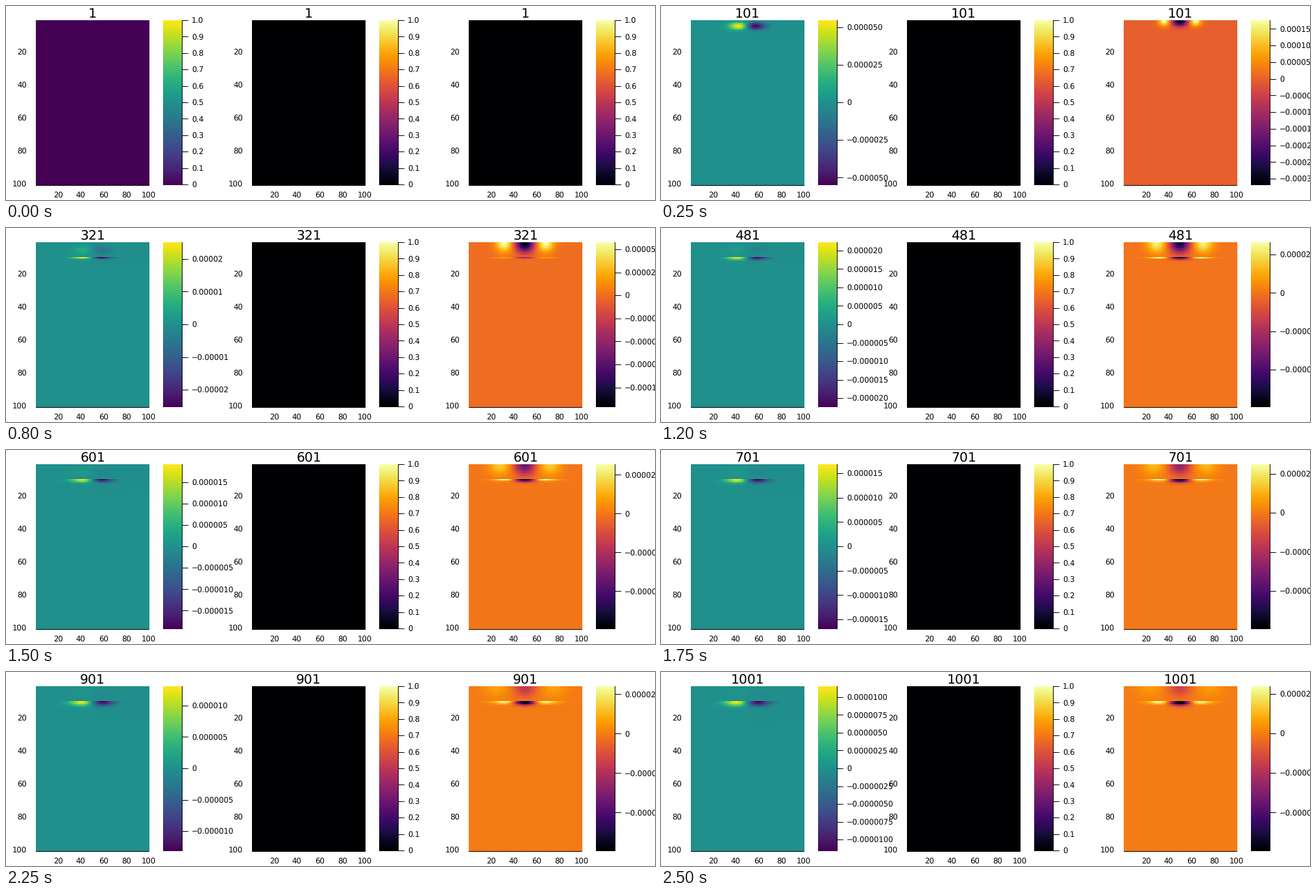
A matplotlib script that plays this animation: 1000 by 300 pixels, repeating every 2.55 s.

```python
import numpy as np
import matplotlib.pyplot as plt
from matplotlib.animation import FuncAnimation
from matplotlib.collections import LineCollection

W, H, DPI = 1000, 300, 100
FRAMES, INTERVAL, STEP = 51, 50, 20
TOP, BOTTOM, WIDTH = 22, 277, 175
BAR_X, BAR_END, TICK = 196, 225, 10
LABEL, TITLE = 11.6 * 0.72, 20.3 * 0.72
N = 100

plt.rcParams["font.family"] = "DejaVu Sans"
plt.rcParams["text.hinting"] = "none"

X = np.arange(1, N + 1)[None, :] - 50.0
Y = np.arange(1, N + 1)[:, None] * 1.0
ABOVE, BELOW = Y < 10, Y >= 10


def bell(d, s):
    return np.exp(-d**2 / (2 * s**2))


def rise(t, scale, power=1):
    return 1 - np.exp(-(t / scale) ** power)


def decay(t, scale, power):
    return 1 / (1 + (t / scale) ** power)


def dipole_field(t):
    """A sinking pair of opposite blobs that feeds a pair held at row 10."""
    s = 6.6 + 0.095 * np.sqrt(t)
    pair = -X / s * np.exp(0.5) * bell(X, s)
    blob = bell(Y - 1.5 - 3.9 * rise(t, 100), 2 * rise(t, 65)) * ABOVE
    held = bell(Y - 10, 0.0017 * t) * BELOW
    flow = 4.1 * np.exp(-t / 790) * rise(t, 235, 3)
    field = pair * (22.7 * decay(t, 60, 2.2) * blob + flow * held)
    top = np.abs(field).max()
    return field * 1e-5, -top * 1e-5, top * 1e-5


def hat_field(t):
    """A spreading dip with side lobes at the surface and a layer at row 10."""
    r = np.sqrt(t)
    peak = 38.7 * decay(t, 216, 2)
    ratio = 0.39 + 0.22 * np.exp(-t / 350)
    lobes = ratio * bell(np.abs(X) - 8 - 0.57 * r, 1.5 + 0.21 * r)
    surface = (lobes - bell(X, 3.5 + 0.11 * r)) * ABOVE
    surface = surface * bell(Y - 1, 4.2 * rise(t, 150))

    s, full = 10.5, 7.4
    hat = ((X / s) ** 2 - 1) * bell(X, s) * bell(Y - 10, 0.0009 * t) * BELOW
    tail = -0.5 * bell(X, 6) * bell(Y - 10, 0.0017 * t) * (Y > 10)
    layer = full * rise(t, 335, 4) * (hat + tail)

    low = max(peak, full)
    return (peak * surface + layer) * 1e-5, -low * 1e-5, low * ratio * 1e-5


def ticks(lo, hi):
    """Finest round step that splits the range into ten parts at most."""
    steps = [(m * 10.0**e, -e + (m == 2.5))
             for e in range(-8, 1) for m in (1, 2.5, 5)]
    step, digits = next(s for s in steps if (hi - lo) / s[0] <= 10 + 1e-9)
    n = np.arange(np.ceil(lo / step), np.floor(hi / step + 1e-9) + 1)
    names = [f"{k * step:.{digits}f}".replace("-", "\u2212") if k else "0"
             for k in n]
    return n * step, names


fig = plt.figure(figsize=(W / DPI, H / DPI), dpi=DPI, facecolor="white")
ax = fig.add_axes([0, 0, 1, 1])
ax.axis("off")


def text(x, y, s, size=LABEL, ha="center"):
    return ax.text(x, y, s, fontsize=size, ha=ha, va="baseline", zorder=4)


def image(data, cmap, x0, x1):
    return ax.imshow(data, cmap=cmap, aspect="auto", interpolation="nearest",
                     extent=(x0, x1, BOTTOM, TOP))


def lines(segments):
    return ax.add_collection(LineCollection(
        segments, colors="black", linewidths=0.72, zorder=3, snap=False))


class Panel:
    def __init__(self, x, cmap):
        self.bar = x + BAR_END
        self.img = image(np.zeros((N, N)), cmap, x, x + WIDTH)
        image(np.linspace(1, 0, 256)[:, None], cmap, x + BAR_X, self.bar)
        base, side = BOTTOM + 0.5, self.bar + 0.5
        lines([[(x, base), (x + WIDTH, base)], [(side, TOP), (side, BOTTOM)]])
        for v in range(20, N + 1, 20):
            part = (v - 0.5) / N
            text(x + part * WIDTH, 297, str(v))
            text(x - 13.7, TOP + part * (BOTTOM - TOP) + 4.6, str(v),
                 ha="right")
        self.title = text(x + WIDTH / 2, 18.3, "", TITLE)
        self.marks = lines([])
        self.labels = [text(self.bar + 15, 0, "", ha="left")
                       for _ in range(11)]

    def show(self, t, data, lo, hi):
        self.title.set_text(str(t))
        self.img.set_data(data)
        self.img.set_clim(lo, hi)
        values, names = ticks(lo, hi)
        ys = BOTTOM - (values - lo) / (hi - lo) * (BOTTOM - TOP - 1)
        self.marks.set_segments(
            [[(self.bar, y), (self.bar + TICK, y)]
             for y in np.floor(ys - 0.5) + 0.5])
        for label in self.labels:
            label.set_text("")
        for label, name, y in zip(self.labels, names, ys):
            label.set_text(name)
            label.set_y(y + 4.1)


panels = [Panel(46, "viridis"), Panel(379, "inferno"), Panel(713, "inferno")]
ax.set_xlim(0, W)
ax.set_ylim(H, 0)
EMPTY = (np.zeros((N, N)), 0, 1)


def update(i):
    t = 1 + STEP * i
    states = (dipole_field(t), EMPTY, hat_field(t)) if i else [EMPTY] * 3
    for panel, state in zip(panels, states):
        panel.show(t, *state)
    return []


anim = FuncAnimation(fig, update, frames=FRAMES, interval=INTERVAL,
                     init_func=lambda: update(0), repeat=True,
                     repeat_delay=0, blit=False)
plt.show()
```
